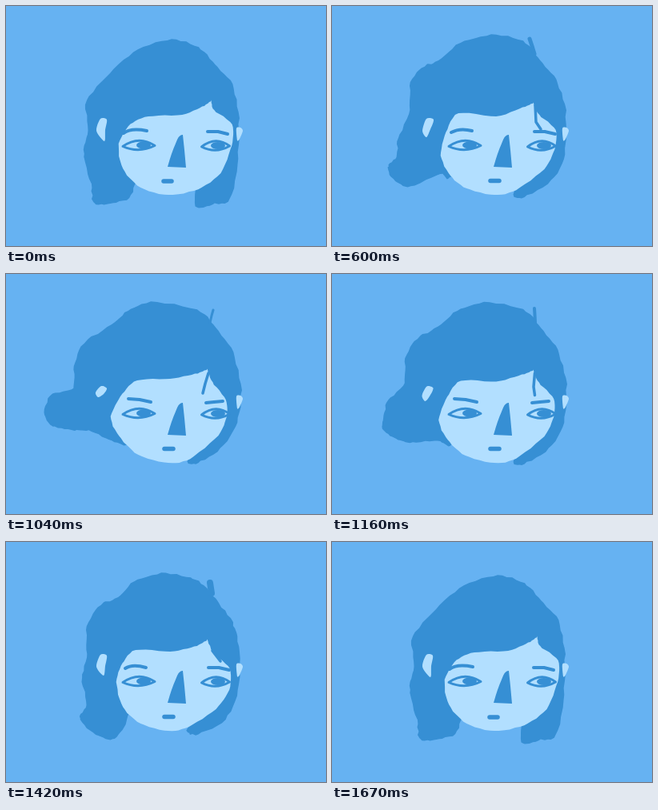
Write an HTML page that moves like this. It is 400 px wide and 300 px high and loops after 1.97 s.

```html
<!DOCTYPE html>
<html lang="en">
<head>
<meta charset="utf-8">
<title>Hair in the wind</title>
<style>
html, body { margin: 0; width: 100%; height: 100%; overflow: hidden; background: #66b2f2; }
svg { display: block; width: 100vw; height: 100vh; }
.dark { fill: #368fd4; }
.light { fill: #b2dfff; }
.line { fill: none; stroke: #368fd4; stroke-linecap: round; stroke-linejoin: round; }
.eye { fill: #b2dfff; stroke: #368fd4; stroke-width: 3; stroke-linejoin: round; }
</style>
</head>
<body>
<svg id="stage" viewBox="0 0 400 300"></svg>
<script>
const parse = text => text.split(' ').map(p => p.split(',').map(Number));
const mix = (a, b, k) => a.map((p, i) => p.map((v, j) => v + (b[i][j] - v) * k));

function seeded(seed) {
  return () => (seed = seed * 16807 % 2147483647) / 2147483647 - 0.5;
}

// Hand-cut outline: a spline through key points with a slightly uneven edge.
// A sharp outline keeps a corner at its first point.
function cut(points, rough = 0, sharp = false) {
  const n = points.length, random = seeded(77), detail = 6, edge = [];
  const at = i => points[(i + n) % n];
  for (let i = 0; i < n; i++) {
    const b = at(i), c = at(i + 1);
    const a = sharp && i === 0 ? b : at(i - 1);
    const e = sharp && i === n - 1 ? c : at(i + 2);
    for (let s = 0; s < detail; s++) {
      const t = s / detail, u = 1 - t;
      edge.push(b.map((v, j) => {
        const out = v + (c[j] - a[j]) / 7, into = c[j] - (e[j] - v) / 7;
        const p = u ** 3 * v + 3 * u * u * t * out + 3 * u * t * t * into + t ** 3 * c[j];
        return (p + random() * rough).toFixed(1);
      }));
    }
  }
  return 'M' + edge.join('L') + 'Z';
}

const rest = {
  hair: parse('208,42 240,51 262,73 283,98 291,140 290,190 280,241 258,248 236,250 235,205 ' +
    '170,215 154,240 130,247 110,247 106,222 97,184 103,155 101,118 130,84 165,54'),
  face: parse('257,118 260,130 283,148 282,175 268,209 240,229 203,236 168,227 146,203 ' +
    '141,172 156,148 178,138 220,136 245,126'),
  ear: parse('118,141 126,142 124,155 123,169 113,156'),
  brows: 'M147 159Q156 152 176 156M252 157L265 157 277 160',
  mouth: 'M197 219H207'
};

const lift = {
  hair: parse('195,39 230,44 250,56 264,74 283,100 291,130 290,185 274,222 240,240 226,236 235,205 ' +
    '165,205 147,232 133,247 108,238 92,220 101,203 95,170 101,140 101,105 118,78 140,70 160,49'),
  face: parse('252,122 260,140 280,158 279,185 262,209 228,231 203,236 168,227 146,206 ' +
    '138,175 146,152 162,135 205,137 235,131'),
  ear: parse('118,141 126,142 124,155 122,167 113,156'),
  sprig: parse('257,64 255,51'), sprigWidth: 8,
  lock: parse('258,136 268,149'),
  brows: 'M149 158Q158 152 175 157M253 157L266 157 279 160',
  mouth: 'M198 218.500H209'
};

const blow = {
  hair: parse('200,36 238,43 261,68 280,92 292,130 291,185 274,218 240,239 226,235 235,205 165,205 ' +
    '145,216 135,210 98,226 76,216 70,200 81,188 83,165 97,130 98,95 115,75 133,69 160,46'),
  face: parse('252,121 259,136 280,155 278,180 265,204 230,230 203,236 168,228 148,212 ' +
    '136,187 143,158 158,134 205,138 238,127'),
  ear: parse('118,141 127,142 123,154 118,164 113,156'),
  sprig: parse('253,60 250,50 247,41'), sprigWidth: 5,
  lock: parse('254,124 255,145 261,154'),
  brows: 'M149 158Q160 152 175 156M253 157L266 157 279 160',
  mouth: 'M198 218.500H209'
};

const gust = {
  hair: parse('182,35 238,44 263,67 284,98 294,145 289,185 268,218 240,236 226,234 235,205 165,205 ' +
    '150,214 128,207 103,196 82,195 58,190 48,172 58,150 84,143 85,115 97,86 132,64 152,46'),
  face: parse('252,119 258,135 275,157 276,178 265,202 230,231 203,236 165,226 141,202 ' +
    '131,178 146,150 164,133 205,131 236,125'),
  ear: parse('119,140 126,143 122,150 115,154 112,148'),
  sprig: parse('255,61 257,52 259,45'), sprigWidth: 3,
  lock: parse('253,124 249,137 246,149'),
  brows: 'M153 156L167 157 181 160M250 161L260 160 271 159',
  mouth: 'M198 218.500H209'
};

const halfway = { ...gust, sprigWidth: 4 };
for (const part of ['hair', 'face', 'ear', 'sprig', 'lock']) {
  halfway[part] = mix(blow[part], gust[part], 0.5);
}

const bend = (pose, move) => ({ ...pose, hair: pose.hair.map(move) });
const peak = bend(gust, ([x, y]) => {
  const k = Math.max(0, 130 - x) / 80;
  return [x - 4 * k, y - 5 * k];
});
const settle = bend(rest, ([x, y]) => [x + Math.max(0, y - 160) * 0.08, y]);

const path = (cls, d) => `<path class="${cls}" d="${d}"/>`;
const line = (d, width) => `<path class="line" d="${d}" stroke-width="${width}"/>`;
const strand = (points, width) => points ? line('M' + points.join('L'), width) : '';

const eye = (x, y, half, pupil) =>
  path('eye', `M${x - half} ${y + 1}Q${x} ${y - 13} ${x + half} ${y}Q${x} ${y + 10} ${x - half} ${y + 1}Z`) +
  `<ellipse class="dark" cx="${x + pupil}" cy="${y - 0.5}" rx="9" ry="4.500"/>`;

const features =
  path('light', cut(parse('288,153 293,152 296,156 292,166 289,168'))) +
  eye(166, 174.5, 20, 6) + eye(262, 175, 17.5, 3) +
  path('dark', 'M202 201Q207 183 212 172Q216 160 221 161L223 180 225 202Z');

const draw = p => '<g visibility="hidden">' +
  path('dark', cut(p.hair, 2)) + strand(p.sprig, p.sprigWidth) +
  path('light', cut(p.face, 1, true)) + path('light', cut(p.ear)) +
  strand(p.lock, 3.5) + features + line(p.brows, 4) + line(p.mouth, 5.5) + '</g>';

const poses = [rest, lift, blow, halfway, gust, peak, settle];
const stage = document.getElementById('stage');
stage.innerHTML = '<rect width="400" height="300" fill="#66b2f2"/>' + poses.map(draw).join('');
const groups = [...stage.querySelectorAll('g')];

// [pose, how long it stays in ms]
const steps = [
  [rest, 500], [lift, 100], [blow, 100], [halfway, 100], [gust, 120], [peak, 120],
  [gust, 120], [halfway, 130], [blow, 130], [lift, 130], [settle, 120], [rest, 300]
];
const loop = steps.reduce((sum, step) => sum + step[1], 0);

function poseAt(t) {
  for (const [pose, stay] of steps) {
    if (t < stay) return pose;
    t -= stay;
  }
}

let begin;
function tick(now) {
  begin ??= now;
  const pose = poseAt((now - begin) % loop);
  groups.forEach((g, i) => g.setAttribute('visibility', poses[i] === pose ? 'visible' : 'hidden'));
  requestAnimationFrame(tick);
}
groups[0].setAttribute('visibility', 'visible');
requestAnimationFrame(tick);
</script>
</body>
</html>
```
